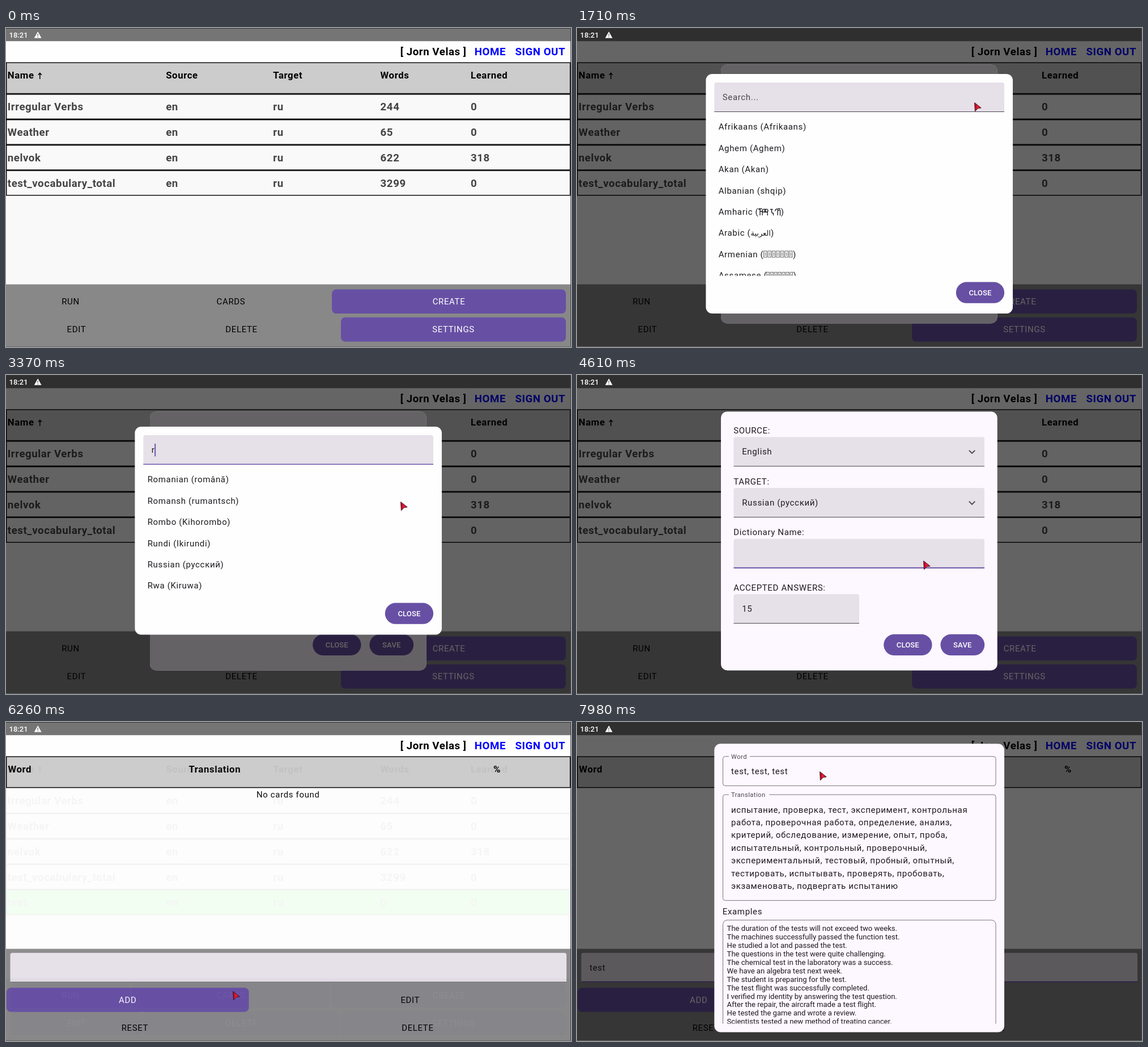
An HTML page that plays this animation: 997 by 562 pixels, repeating every 8000 ms.

```html
<!DOCTYPE html>
<html lang="en">
<head>
<meta charset="utf-8">
<title>Dictionaries</title>
<style>
html, body { margin: 0; width: 100%; height: 100%; overflow: hidden; background: #fff; }
svg { display: block; width: 997px; height: 562px; font-family: Roboto, "Noto Sans", sans-serif; }
text { white-space: pre; }
.body { font-size: 15px; letter-spacing: .65px; }
.row { font-size: 18.7px; font-weight: 700; letter-spacing: .55px; }
.head { font-size: 16.8px; font-weight: 700; letter-spacing: .6px; }
.btn { font-size: 13.1px; font-weight: 500; letter-spacing: .1px; }
.tag { font-size: 11.2px; letter-spacing: .45px; }
.note { font-size: 13.08px; }
.clock { font-size: 13px; font-weight: 500; }
.arab { font-family: "DejaVu Sans", sans-serif; font-size: 13px; letter-spacing: 0; }
</style>
</head>
<body>
<svg id="stage" viewBox="0 0 997 562"></svg>
<script>
const PURPLE = '#6750a4', FIELD = '#e6e0e9', SURFACE = '#fdf7ff', INK = '#1d1b20', SOFT = '#49454f';
const SIZE = { body: 15, row: 18.7, head: 16.8, btn: 13.1, tag: 11.2, note: 13.08, clock: 13 };

// --- drawing helpers; text is placed by the centre of its line ---
const text = (x, cy, s, cls = 'body', fill = INK, anchor = 'start', id = '') =>
  `<text ${id && `id="${id}"`} class="${cls}" x="${x}" y="${(cy + SIZE[cls] * .345).toFixed(2)}" fill="${fill}" text-anchor="${anchor}">${s}</text>`;
const rect = (x, y, w, h, fill, more = '') =>
  `<rect x="${x}" y="${y}" width="${w}" height="${h}" fill="${fill}" ${more}/>`;
const group = (id, inner, more = '') => `<g id="${id}" ${more}>${inner}</g>`;
const lines = (x, y, step, list, cls) => list.map((s, i) => text(x, y + i * step, s, cls)).join('');

const frame = (y, h, fill) => rect(.7, y + .7, 994.9, h - 1.4, fill, 'stroke="#000" stroke-width="1.4"');
const pill = (x, y, w, s) => rect(x, y, w, 37.3, PURPLE, 'rx="18.6"') + text(x + w / 2, y + 18.6, s, 'btn', '#fff', 'middle');
const button = (x, y, w, s) => rect(x, y, w, 42.6, PURPLE, 'rx="7.5"') + text(x + w / 2, y + 21.3, s, 'body', '#fff', 'middle');
const flat = (cx, cy, s) => text(cx, cy, s, 'body', '#000', 'middle');
const field = (x, y, w) =>
  `<path d="M${x} ${y + 52}v-48.3q0-3.7 3.7-3.7h${w - 7.4}q3.7 0 3.7 3.7v48.3z" fill="${FIELD}"/>`;
const underline = (id, x, y, w) => rect(x, y + 51, w, 1, SOFT, `id="${id}"`);
const chevron = cy => `<path d="M691.8 ${cy - 2.6}l5.2 5.2l5.2-5.2" fill="none" stroke="${SOFT}" stroke-width="1.9"/>`;
const caret = (id, y) => rect(0, y, 1.9, 22.4, PURPLE, `id="${id}"`);
const outline = (y, h, label, gap) =>
  rect(257.5, y, 481.5, h, 'none', 'rx="4" stroke="#79747e" stroke-width="1"') +
  rect(268, y - 2, gap, 4, SURFACE) + text(272, y, label, 'tag', SOFT);

// --- screens ---
const COLS = [2.8, 282.2, 471.3, 660.6, 820];
const row = (i, cells, fill = '#f9f9f9') => {
  const y = 116.2 + 44.8 * i;
  return frame(y, 44.8, fill) + cells.map((s, k) => text(COLS[k], y + 22.5, s, 'row', '#444')).join('');
};

const listPage =
  rect(0, 60, 997, 502, '#f9f9f9') + frame(60.4, 55.8, '#ccc') +
  text(2.8, 83.6, 'Name', 'head', '#000') +
  '<path d="M59.8 90V79.4M56.8 82.8l3-3.4l3 3.4" fill="none" stroke="#000" stroke-width="1.5"/>' +
  ['Source', 'Target', 'Words', 'Learned'].map((s, i) => text(COLS[i + 1], 83, s, 'head', '#000')).join('') +
  row(0, ['Irregular Verbs', 'en', 'ru', '244', '0']) + row(1, ['Weather', 'en', 'ru', '65', '0']) +
  row(2, ['nelvok', 'en', 'ru', '622', '318']) + row(3, ['test_vocabulary_total', 'en', 'ru', '3299', '0']) +
  group('newRow', row(4, ['test', 'en', 'ru', '0', '0'], '#0f0')) +
  rect(0, 451.6, 997, 111, '#888') +
  button(575, 460.5, 413, 'CREATE') + button(591, 509.8, 397, 'SETTINGS') +
  group('off', flat(114, 481.8, 'RUN') + flat(397, 481.8, 'CARDS') + flat(124.5, 531.1, 'EDIT') + flat(415.5, 531.1, 'DELETE')) +
  group('on', button(9, 460.5, 210, 'RUN') + button(222, 460.5, 350, 'CARDS') +
    button(9, 509.8, 231, 'EDIT') + button(242.3, 509.8, 346.4, 'DELETE'));

const cardsPage =
  rect(0, 60, 997, 502, '#fefefe') + frame(60.4, 55.8, '#ccc') +
  text(3.4, 83, 'Word', 'head', '#000') + text(322.4, 83, 'Translation', 'head', '#000') + text(860, 83, '%', 'head', '#000') +
  text(497.8, 127.8, 'No cards found', 'body', '#000', 'middle') +
  rect(0, 399.6, 997, 163, '#888') +
  field(7.5, 406.7, 981.5) + underline('wordLine', 7.5, 406.7, 981.5) +
  text(22.2, 433, '', 'body', INK, 'start', 'word') + caret('wordCaret', 421.8) +
  button(1, 468.2, 427.5, 'ADD') + flat(713.3, 489.5, 'EDIT') + flat(227.4, 538.5, 'RESET') + flat(726.4, 538.5, 'DELETE');

const createDialog =
  rect(254, 64.5, 487.7, 455.9, SURFACE, 'rx="11.2"') +
  text(276.3, 97.8, 'SOURCE:') + field(276.5, 109.2, 442.5) + underline('srcLine', 276.5, 109.2, 442.5) +
  text(291.2, 135.2, 'English', 'body', INK, 'start', 'src') + chevron(135.4) +
  text(276.3, 187.6, 'TARGET:') + field(276.5, 199, 442.5) + underline('dstLine', 276.5, 199, 442.5) +
  text(291.2, 225, 'Russian (русский)', 'body', INK, 'start', 'dst') + chevron(225.2) +
  text(276.3, 277.3, 'Dictionary Name:') + field(276.5, 288.7, 442.5) + underline('nameLine', 276.5, 288.7, 442.5) +
  text(291.2, 314.8, '', 'body', INK, 'start', 'name') + caret('nameCaret', 303.6) +
  text(276.3, 374.4, 'ACCEPTED ANSWERS:') + field(276.5, 385.9, 221.5) + underline('numLine', 276.5, 385.9, 221.5) +
  text(291.2, 412, '15') + pill(541.2, 456.8, 85.3, 'CLOSE') + pill(641.4, 456.8, 77.8, 'SAVE') +
  rect(254, 64.5, 487.7, 455.9, '#000', 'rx="11.2" id="shade"');

const tofu = (x, cy, step) => Array.from({ length: 7 }, (_, i) =>
  rect(x + i * step + 1, cy - 5.5, step - 2, 11, 'none', 'stroke="#444" stroke-width=".8"') +
  rect(x + i * step + step / 2 - .7, cy - 3, 1.4, 6, '#888')).join('');
const ITEM = 37.35;
const item = i => 174.3 + i * ITEM;
const amharic = '<path d="M321 320.5v-2h5.5M323 318.5v4.5h4v7M323 323v7M330 319.5a2 2.6 0 1 1 .1 4.6a2 2.6 0 1 1 0-4.6M334 319.5a2 2.6 0 1 1 .1 4.6a2 2.6 0 1 1 0-4.6M336.2 322v8.3M341 319.5h4.5M343.5 319.5v4a3 3 0 0 0 3 3v3.8M349.5 322.5q1-4 3.5-3.5t1 4.5v6.5M354 323q2.5-4 4.5-1.5v9M354.5 318.2h4" fill="none" stroke="#1d1b20" stroke-width="1.35"/>';
const allLangs =
  lines(249.7, item(0), ITEM, ['Afrikaans (Afrikaans)', 'Aghem (Aghem)', 'Akan (Akan)', 'Albanian (shqip)', 'Amharic (',
    'Arabic (<tspan class="arab">العربية</tspan>)', 'Armenian (', 'Assamese ('], 'body') +
  amharic + text(359.8, item(4), ')') +
  tofu(328.3, item(6), 7.5) + text(381, item(6), ')') + tofu(333.3, item(7), 6.9) + text(381.6, item(7), ')');
const eLangs = lines(249.7, item(0), ITEM, ['Embu (Kĩembu)', 'English', 'Esperanto (esperanto)', 'Estonian (eesti)', 'Ewe (eʋegbe)', 'Ewondo (ewondo)'], 'body');
const rLangs = lines(249.7, item(0), ITEM, ['Romanian (română)', 'Romansh (rumantsch)', 'Rombo (Kihorombo)', 'Rundi (Ikirundi)', 'Russian (русский)', 'Rwa (Kiruwa)'], 'body');

const picker =
  rect(227.4, 81, 541.6, 422, '#fefefe', 'rx="11.2" id="pickBox"') +
  group('pickTop',
    field(242.3, 96, 511.7) + underline('pickLine', 242.3, 96, 511.7) +
    text(256.8, 122.2, '', 'body', SOFT, 'start', 'query') + caret('pickCaret', 111) +
    group('all', allLangs, 'clip-path="url(#listClip)"') + group('eList', eLangs) + group('rList', rLangs)) +
  group('pickClose', pill(668.8, 447.5, 85.3, 'CLOSE'));

const wordDialog =
  rect(242.3, 38.2, 511.7, 508.3, SURFACE, 'rx="11.2"') +
  outline(60.7, 51.6, 'Word', 37) + text(272, 87, 'test, test, test') +
  outline(128, 186.4, 'Translation', 71) +
  lines(272, 154.4, 22.43, [
    'испытание, проверка, тест, эксперимент, контрольная', 'работа, проверочная работа, определение, анализ,',
    'критерий, обследование, измерение, опыт, проба,', 'испытательный, контрольный, проверочный,',
    'экспериментальный, тестовый, пробный, опытный,', 'тестировать, испытывать, проверять, пробовать,',
    'экзаменовать, подвергать испытанию'], 'body') +
  text(256.8, 333.4, 'Examples') +
  group('examples',
    rect(257.5, 349, 481.5, 300, 'none', 'rx="7.5" stroke="#79747e" stroke-width="1"') +
    lines(264.6, 363.4, 14.95, [
      'The duration of the tests will not exceed two weeks.', 'The machines successfully passed the function test.',
      'He studied a lot and passed the test.', 'The questions in the test were quite challenging.',
      'The chemical test in the laboratory was a success.', 'We have an algebra test next week.',
      'The student is preparing for the test.', 'The test flight was successfully completed.',
      'I verified my identity by answering the test question.', 'After the repair, the aircraft made a test flight.',
      'He tested the game and wrote a review.', 'Scientists tested a new method of treating cancer.'], 'note'),
    'clip-path="url(#noteClip)"');

document.getElementById('stage').innerHTML =
  `<defs><clipPath id="listClip">${rect(240, 150, 520, 286.6)}</clipPath>
  <clipPath id="noteClip">${rect(250, 340, 500, 191.5)}</clipPath>
  <linearGradient id="red" x2="1"><stop stop-color="#b00020"/><stop offset=".5" stop-color="#e8203c"/><stop offset="1" stop-color="#a01028"/></linearGradient></defs>` +
  rect(0, 0, 997, 562, '#fefefe') + rect(0, 0, 997, 23.2, '#757575') +
  text(812.6, 42, '[ Jorn Velas ]', 'row', '#000', 'end') +
  text(826.8, 42, 'HOME', 'row', '#00f') + text(898.4, 42, 'SIGN OUT', 'row', '#00f') +
  group('list', listPage) + group('cards', cardsPage) +
  rect(0, 0, 997, 562, '#000', 'id="scrim"') +
  text(5.6, 12.6, '18:21', 'clock', '#fff') +
  '<path d="M56.2 6.3L62.6 17.8H49.8z" fill="#fff"/><path d="M56.2 10v4M56.2 15v1.5" stroke="#666" stroke-width="1.3"/>' +
  group('create', createDialog) + group('picker', picker) + group('add', wordDialog) +
  rect(0, 0, 997, 1, '#333') + rect(996, 0, 1, 562, '#444') + rect(0, 561, 997, 1, '#666') +
  `<path id="cursor" d="M.6 .6L12.2 9.8L6.4 10.6L1.4 15.8z" fill="url(#red)" stroke="#3a1016" stroke-width=".9" stroke-linejoin="round"/>`;

// --- motion ---
const el = {};
document.querySelectorAll('[id]').forEach(n => el[n.id] = n);
const set = (id, name, v) => el[id].setAttribute(name, v);
const show = (id, on) => { el[id].style.display = on ? '' : 'none'; };
const ramp = (t, a, b) => Math.min(1, Math.max(0, (t - a) / (b - a)));
const ease = p => p * p * (3 - 2 * p);
const pulse = (t, a, b, c, d) => ease(ramp(t, a, b)) * (1 - ease(ramp(t, c, d)));
const typed = (s, t, start, step) => t < start ? '' : s.slice(0, 1 + Math.floor((t - start) / step));
const during = (t, a, b) => t >= a && t < b;

const PATH = [[170, 880, 505], [200, 827, 482], [450, 827, 482], [1150, 701, 131], [2100, 701, 131], [2450, 696, 223],
  [3420, 696, 223], [3800, 611, 327], [5150, 611, 327], [5380, 681, 466], [5590, 681, 466], [5940, 400, 474],
  [6400, 400, 474], [6590, 397, 427], [7280, 397, 427], [7430, 223, 479], [7540, 223, 479], [7970, 428, 87]];

function moveCursor(t) {
  show('cursor', t >= PATH[0][0]);
  let i = 0;
  while (i < PATH.length - 2 && t >= PATH[i + 1][0]) i++;
  const [a, x, y] = PATH[i], [b, u, v] = PATH[i + 1], p = ease(ramp(t, a, b));
  set('cursor', 'transform', `translate(${x + (u - x) * p} ${y + (v - y) * p})`);
}

function fade(id, p, cx, cy) {
  show(id, p > 0);
  const k = .94 + .06 * p;
  set(id, 'opacity', p);
  set(id, 'transform', `translate(${cx * (1 - k)} ${cy * (1 - k)}) scale(${k})`);
}

function focus(id, bottom, on, weight = 1.9) {
  const h = on ? weight : 1;
  set(id, 'y', bottom - h);
  set(id, 'height', h);
  set(id, 'fill', on ? PURPLE : SOFT);
}

function write(id, s, caretId, x, on) {
  if (el[id].textContent !== s) el[id].textContent = s;
  show(caretId, on);
  if (on) set(caretId, 'x', x + (s ? el[id].getComputedTextLength() : 0));
}

function drawPicker(t) {
  const second = t > 2800;
  const p = second ? pulse(t, 2840, 3060, 3900, 4070) : pulse(t, 1320, 1530, 2560, 2740);
  const open = t >= (second ? 3370 : 2030);
  fade('picker', p, 498, 292);
  set('shade', 'opacity', .6 * p);
  set('pickBox', 'y', open ? 91 : 81);
  set('pickBox', 'height', open ? 366.5 : 422);
  set('pickTop', 'transform', `translate(0 ${open ? 10 : 0})`);
  set('pickClose', 'transform', `translate(0 ${open ? -46 : 0})`);
  set('query', 'fill', open ? INK : SOFT);
  write('query', open ? (second ? 'r' : 'e') : 'Search...', 'pickCaret', 256.5, open && p > 0);
  focus('pickLine', 148, open, 1.4);
  show('all', !open);
  show('eList', open && !second);
  show('rList', open && second);
}

function draw(t) {
  const make = pulse(t, 430, 640, 5400, 5545), add = ease(ramp(t, 7530, 7740));
  const saved = t >= 5470, page = ease(ramp(t, 6000, 6300));
  show('newRow', saved);
  show('on', saved);
  show('off', !saved);
  show('list', page < 1);
  show('cards', page > 0);
  set('cards', 'opacity', page);
  set('scrim', 'opacity', .6 * Math.max(make, add));

  fade('create', make, 498, 292);
  fade('add', add, 498, 292);
  drawPicker(t);
  show('src', t >= 2560);
  show('dst', t >= 3900);
  focus('srcLine', 161.2, during(t, 1320, 4400));
  focus('nameLine', 340.7, t >= 4400);
  write('name', typed('test', t, 4760, 70), 'nameCaret', 291.2, during(t, 4430, 4610) || during(t, 4760, 5250));

  focus('wordLine', 458.7, t >= 6560);
  write('word', typed('test', t, 6890, 60), 'wordCaret', 22.4, during(t, 6560, 6740) || during(t, 6890, 7280));
  moveCursor(t);
}

const began = performance.now();
function tick() {
  draw((performance.now() - began) % 8000);
  requestAnimationFrame(tick);
}
tick();
</script>
</body>
</html>
```
